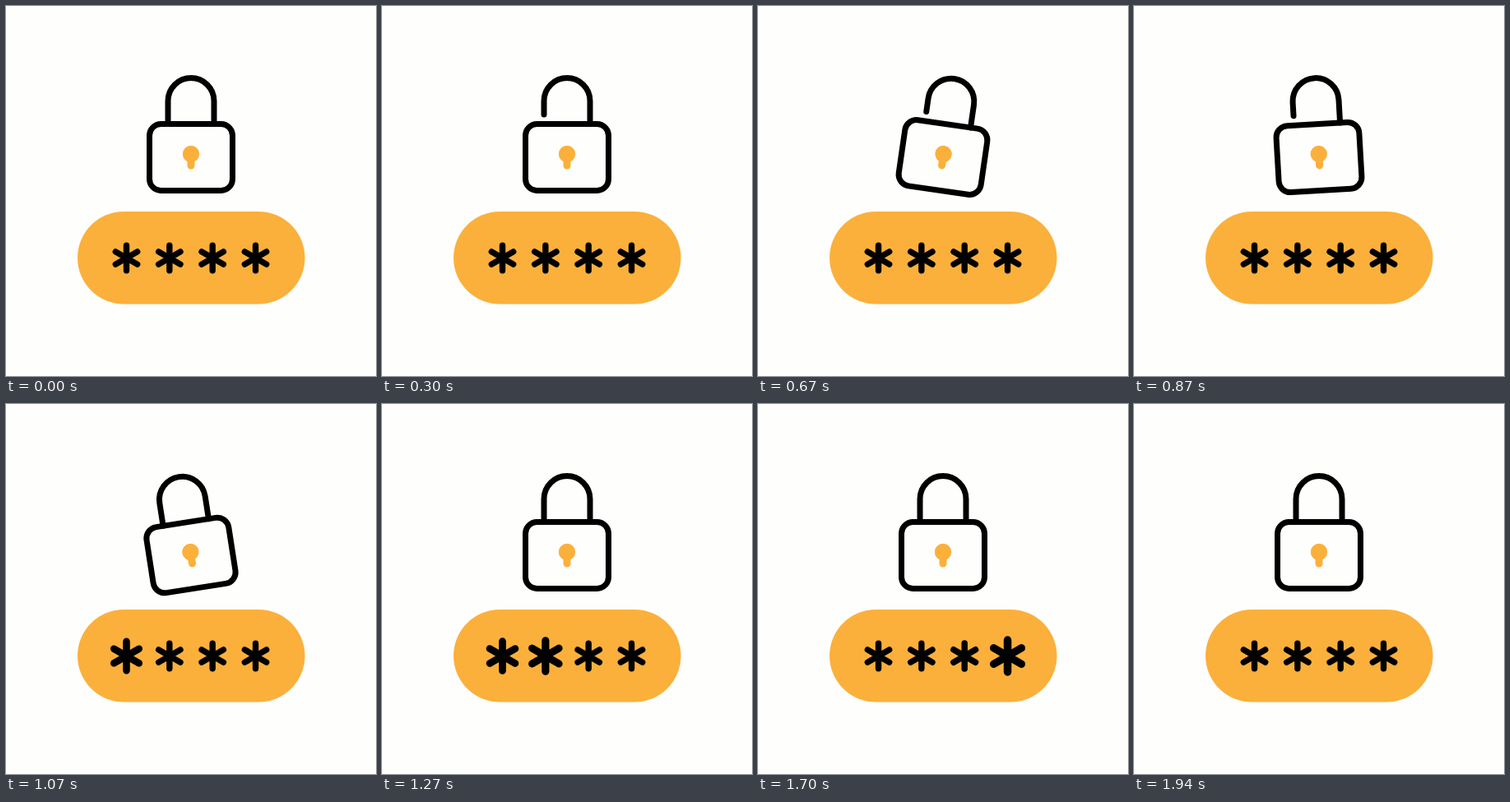
An HTML page for the animation above (2000 ms loop, 450 by 450 pixels).

```html
<!DOCTYPE html>
<html lang="en">
<head>
<meta charset="utf-8">
<title>Padlock and password</title>
<style>
  html, body { margin: 0; width: 100%; height: 100%; overflow: hidden; background: #fefefd; }
  svg { display: block; width: 100vw; height: 100vh; }
  .line { fill: none; stroke: #000; stroke-width: 7; stroke-linecap: round; }
  .gold { fill: #fbb03b; }
  #shackle { stroke-dasharray: 143 143; }
  #stars { stroke-width: 7.4; }
</style>
</head>
<body>
<svg viewBox="0 0 450 450">
  <g id="lock">
    <path id="shackle" class="line" pathLength="143" d="M253 143.5V115.5A28 28 0 0 0 197 115.5V143.5"/>
    <rect class="line" x="174.5" y="143.5" width="101" height="81" rx="14"/>
    <circle class="gold" cx="225" cy="180" r="10.2"/>
    <rect class="gold" x="220.5" y="180" width="9" height="18.5" rx="4.5"/>
  </g>
  <rect class="gold" x="87" y="250" width="276.5" height="112.5" rx="56.25"/>
  <g id="stars"></g>
</svg>
<script>
  const LOOP = 2000;
  const STEP = 1000 / 30;
  const STAGGER = 5 * STEP;
  const ARM = 15.2;

  const lock = document.getElementById('lock');
  const shackle = document.getElementById('shackle');

  // keys: [time in ms, value], eased in and out between neighbours
  const swing = [[300, 0], [600, 9.3], [1033, -9.3], [1267, 0]];
  const gap = [[0, 0], [233, 11.5], [867, 11.5], [1050, 0]];
  const pulse = [[967, 1], [1160, 1.3], [1400, 1]];

  function valueAt(keys, t) {
    const next = keys.findIndex(([time]) => time > t);
    if (next === 0) return keys[0][1];
    if (next < 0) return keys[keys.length - 1][1];
    const [t0, a] = keys[next - 1];
    const [t1, b] = keys[next];
    const p = (t - t0) / (t1 - t0);
    return a + (b - a) * (1 - Math.cos(Math.PI * p)) / 2;
  }

  function makeStar() {
    const star = document.createElementNS('http://www.w3.org/2000/svg', 'path');
    const arms = [30, 90, 150].map(deg => {
      const x = ARM * Math.cos(deg * Math.PI / 180);
      const y = ARM * Math.sin(deg * Math.PI / 180);
      return `M${-x} ${-y}L${x} ${y}`;
    });
    star.setAttribute('d', arms.join(''));
    star.setAttribute('class', 'line');
    star.style.strokeWidth = 'inherit';
    document.getElementById('stars').append(star);
    return star;
  }

  const stars = Array.from({ length: 4 }, makeStar);

  function draw(t) {
    lock.setAttribute('transform', `rotate(${valueAt(swing, t)} 225 184)`);
    shackle.style.strokeDashoffset = valueAt(gap, t);
    stars.forEach((star, i) => {
      const scale = valueAt(pulse, t - i * STAGGER);
      star.setAttribute('transform', `translate(${146.5 + i * 52.35} 306.5) scale(${scale})`);
    });
  }

  const start = performance.now();

  // Poses hold for one step each, 30 per second.
  function tick() {
    const t = (performance.now() - start) % LOOP;
    draw(Math.floor((t + 4) / STEP) * STEP % LOOP);
    requestAnimationFrame(tick);
  }
  tick();
</script>
</body>
</html>
```
